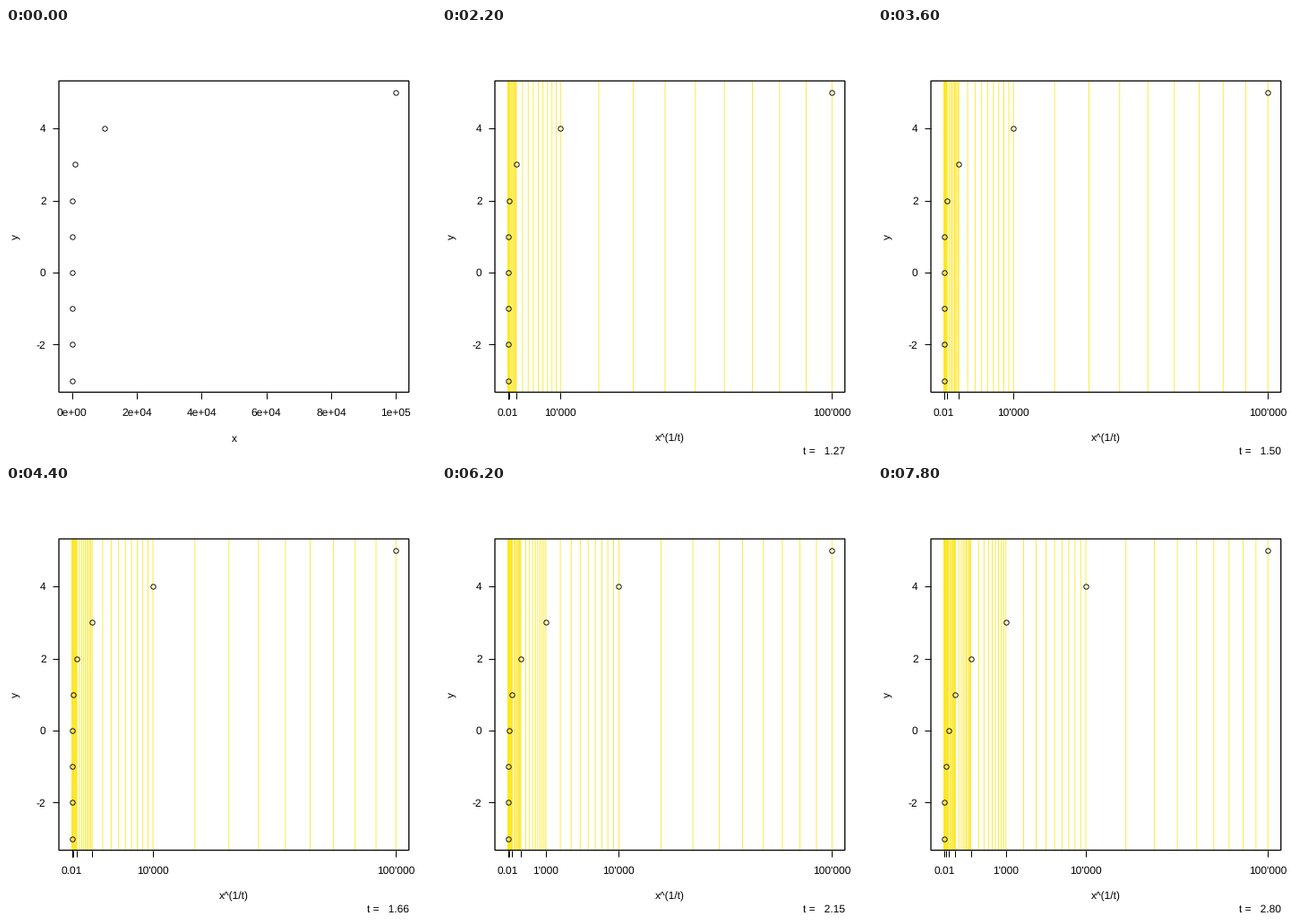
These frames come from a looping animation (480 by 480 pixels, 8 s). A matplotlib script:

```python
import matplotlib.pyplot as plt
import numpy as np
from matplotlib.animation import FuncAnimation
from matplotlib.collections import LineCollection
from matplotlib.patches import Rectangle

plt.rcParams.update({
    "font.family": "Liberation Sans",
    "text.hinting": "none",
    "text.parse_math": False,
})

SIZE, DPI = 480, 80
PX = 72 / DPI                      # points per pixel
FRAMES, STEP = 40, 200

# Plot box in pixels, y pointing down
LEFT, RIGHT, TOP, BOTTOM = 59.04, 449.76, 59.04, 406.56
PAD = 0.04 / 1.08
X0 = LEFT + PAD * (RIGHT - LEFT)
X1 = RIGHT - PAD * (RIGHT - LEFT)
Y0 = BOTTOM - PAD * (BOTTOM - TOP)
Y1 = TOP + PAD * (BOTTOM - TOP)
TICK = 7.2

exps = np.arange(-3, 6)
data_x = 10.0 ** exps
grid_x = np.append(np.outer(10.0 ** np.arange(-3, 5), np.arange(1, 10)), 1e5)
tick_x = 10.0 ** np.arange(-2, 6)
tick_text = ["0.01", "0.1", "1", "10", "100", "1'000", "10'000", "100'000"]


def y_px(v):
    return Y0 + (v + 3) / 8 * (Y1 - Y0)


def x_px(x, t):
    """Pixel position of x on the axis scaled by x^(1/t)."""
    lo, hi = 1e-3 ** (1 / t), 1e5 ** (1 / t)
    return X0 + (x ** (1 / t) - lo) / (hi - lo) * (X1 - X0)


def t_at(i):
    return (1 - 0.011077 * i) ** (-1 / 0.55)


def text_width(s):
    return sum(2.29 if c == "'" else 3.33 if c == "." else 6.67 for c in s)


def shown_labels(pos, labels):
    """Keep each label that clears the previous one by a small gap."""
    edge, keep = -SIZE, []
    for x, s in zip(pos, labels):
        half = text_width(s) / 2
        if x - half > edge + 10:
            keep.append(s)
            edge = x + half
        else:
            keep.append("")
    return keep


def vlines(xs, top, bottom):
    return [[(x, top), (x, bottom)] for x in xs]


fig = plt.figure(figsize=(SIZE / DPI, SIZE / DPI), dpi=DPI, facecolor="white")
ax = fig.add_axes([0, 0, 1, 1])
ax.set_xlim(0, SIZE)
ax.set_ylim(SIZE, 0)
ax.axis("off")


def label(x, y, s="", ha="center", va="baseline", **kw):
    return ax.text(x, y, s, size=12 * PX, ha=ha, va=va, color="black", **kw)


grid = LineCollection([], colors="#fde725", linewidths=0.85 * PX,
                      capstyle="butt", zorder=1)
grid.set_snap(False)
ax.add_collection(grid, autolim=False)

ax.add_patch(Rectangle((LEFT, TOP), RIGHT - LEFT, BOTTOM - TOP, fill=False,
                       ec="black", lw=1.3 * PX, snap=False, zorder=2))

ticks = LineCollection([], colors="black", linewidths=PX, zorder=2)
ax.add_collection(ticks, autolim=False)

y_ticks = [-2, 0, 2, 4]
ax.add_collection(LineCollection(
    [[(LEFT - TICK, y_px(v)), (LEFT, y_px(v))] for v in y_ticks],
    colors="black", linewidths=PX, zorder=2), autolim=False)
for v in y_ticks:
    label(LEFT - 14.4, y_px(v) + 4.3, str(v), ha="right")

points, = ax.plot([], [], "o", ms=5.4 * PX, mfc="none", mec="black",
                  mew=0.9 * PX, zorder=3)
points.set_snap(False)

label(10.4, (TOP + BOTTOM) / 2, "y", va="center", rotation=90)
x_title = label((LEFT + RIGHT) / 2, 462)
t_text = label(RIGHT, 476, ha="right")
x_labels = [label(0, 433) for _ in tick_x]


def draw(i):
    t = t_at(i)
    if i == 0:
        pos = np.linspace(X0, X1, 6)
        names = ["0e+00", "2e+04", "4e+04", "6e+04", "8e+04", "1e+05"]
        grid.set_segments([])
        x_title.set_text("x")
        t_text.set_text("")
    else:
        pos = x_px(tick_x, t)
        names = shown_labels(pos, tick_text)
        grid.set_segments(vlines(x_px(grid_x, t), TOP, BOTTOM))
        x_title.set_text("x^(1/t)")
        t_text.set_text(f"t =   {t:.2f}")

    ticks.set_segments(vlines(pos, BOTTOM, BOTTOM + TICK))
    for item in x_labels:
        item.set_text("")
    for item, x, s in zip(x_labels, pos, names):
        item.set_x(x)
        item.set_text(s)
    points.set_data(x_px(data_x, t), y_px(exps))
    return []


anim = FuncAnimation(fig, draw, frames=FRAMES, interval=STEP,
                     init_func=lambda: draw(0), repeat=True, repeat_delay=0)
plt.show()
```
